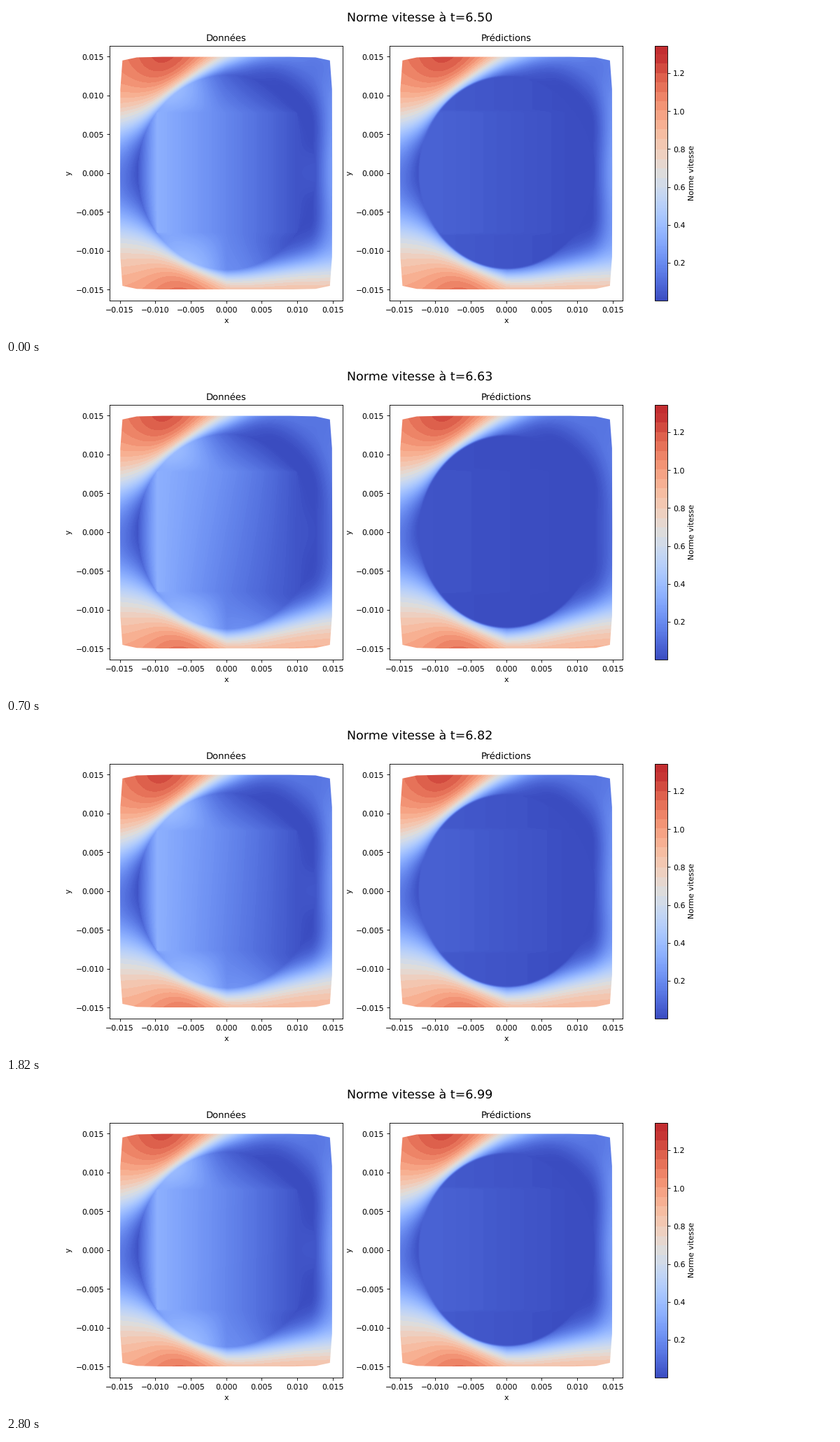
Recreate the animation shown at these times as a matplotlib script. Size 1183 px wide and 473 px high, loop 2.94 s.

```python
import numpy as np
import matplotlib.pyplot as plt
from matplotlib.animation import FuncAnimation
from matplotlib.colors import ListedColormap
from matplotlib.patches import Polygon

DPI = 78.8667
FRAMES, INTERVAL = 21, 140
L = 0.015                    # half width of the domain
R = 0.835                    # obstacle radius, in units of L
BOX_X, BOX_Y = 0.653, 0.513  # inner rectangle touching the obstacle
VMIN, VMAX = 0.001, 1.345
TURNS = 0.1495               # shedding cycles per frame


def sigmoid(t):
    return 1 / (1 + np.exp(-np.clip(t, -30, 30)))


def smooth(t):
    t = np.clip(t, 0, 1)
    return t * t * (3 - 2 * t)


def phase(k):
    return 2 * np.pi * (TURNS * k + 0.125)


def jet(x, y, p):
    """Stream passing above the obstacle, attached or lifted with the phase."""
    c, s = np.cos(p), np.sin(p)
    rear, front = np.maximum(x, 0), np.minimum(x, 0)
    entry = sigmoid((y - 0.4 + 0.1 * c) / (0.2 - 0.05 * c))
    edge = (0.9 + 0.085 * c + 0.5 * front - 0.7 * front**2
            + (0.2 + 0.43 * c - 0.1 * s) * rear)
    layer = sigmoid((y - edge) / (0.075 + 0.03 * rear))
    peak = np.exp(-((x + 0.5 + 0.12 * c) / 0.35)**2 - ((1 - y) / 0.35)**2)
    return (1.05 + 0.2 * peak) * entry * layer


def flow(x, y, p):
    """Speed around the obstacle: two mirrored jets, a wall layer and a wake."""
    r = np.hypot(x, y) + 1e-9
    delta = 0.07 + 0.15 * np.maximum(-x / r, 0)**8
    wall = 1 - np.exp(-np.maximum(r - 0.79, 0) / delta)
    jets = jet(x, y, p) + jet(x, -y, p + np.pi)
    wake = (0.16 + 0.08 * np.sin(2 * p)) * smooth((x - 0.78) / 0.22) * np.exp(-2.5 * y**2)
    wake = wake + 0.12 * smooth((r - 0.9) / 0.3) * smooth(x + 0.5)
    return wall * jets + wake * (1 - np.clip(jets, 0, 1))


# Grid, about one sample per pixel
X, Y = np.meshgrid(np.linspace(-1, 1, 304), np.linspace(-1, 1, 333))
r = np.hypot(X, Y) + 1e-9
RIM_X, RIM_Y = X * R / r, Y * R / r
box = np.minimum(BOX_X * r / (np.abs(X) + 1e-9), BOX_Y * r / (np.abs(Y) + 1e-9))
CAP = np.clip((r - box) / (np.maximum(R - box, 0) + 0.012), 0, 1)
OUTSIDE = smooth((r - 0.815) / 0.025)
U = np.clip(X / BOX_X, -1.1, 1)
DIM = 1 - 0.3 * smooth((np.abs(Y) - BOX_Y) / 0.03)


def fields(k):
    p = phase(k)
    outer = flow(X, Y, p)
    tilt = 0.05 * Y * np.sin(p - np.pi / 4) * (1 - U**2)
    core = (0.185 - 0.155 * U - tilt) * (1 - CAP) + flow(RIM_X, RIM_Y, p) * CAP
    data = np.where(r > R, outer, core)
    calm = (0.027 + 0.013 * np.sin(2 * p)) * (1 - 0.8 * U) * DIM
    pred = calm * (1 - OUTSIDE) + outer * OUTSIDE
    return np.clip(data, VMIN, VMAX), np.clip(pred, VMIN, VMAX)


def palette(n=216):
    """Fine steps in the blues, coarse steps in the reds."""
    v = (np.arange(n) + 0.5) / n * VMAX
    v = np.where(v > 0.6, (np.floor(v / 0.05) + 0.5) * 0.05, v)
    return ListedColormap(plt.get_cmap("coolwarm")(np.minimum(v / VMAX, 0.96)))


def outline():
    q = np.array([(.997, 0), (.995, .72), (.975, .967), (.84, .993), (.6, .998)])
    half = np.vstack([q, q[::-1] * (-1, 1)])
    return np.vstack([half, half[::-1] * (1, -1)]) * L


plt.rcParams["text.hinting"] = "none"
fig, axes = plt.subplots(1, 2, figsize=(1183.01 / DPI, 473.01 / DPI), dpi=DPI)
cmap = palette()
images = []
for ax, name, z in zip(axes, ("Données", "Prédictions"), fields(0)):
    im = ax.imshow(z, extent=(-L, L, -L, L), origin="lower", aspect="auto",
                   cmap=cmap, vmin=VMIN, vmax=VMAX, interpolation="bilinear")
    im.set_clip_path(Polygon(outline(), transform=ax.transData))
    ax.set(title=name, xlabel="x", ylabel="y",
           xlim=(-0.01645, 0.01645), ylim=(-0.0164, 0.0164))
    ax.tick_params(axis="x", pad=4.2)
    images.append(im)
fig.colorbar(images[0], ax=list(axes), label="Norme vitesse")
title = fig.suptitle("", fontsize=16, y=0.982)


def draw(k):
    for im, z in zip(images, fields(k)):
        im.set_data(z)
    title.set_text(f"Norme vitesse à t={6.504 + 0.0245 * k:.2f}")
    return [*images, title]


anim = FuncAnimation(fig, draw, frames=FRAMES, interval=INTERVAL, repeat=True,
                     repeat_delay=0, blit=False)
plt.show()
```
